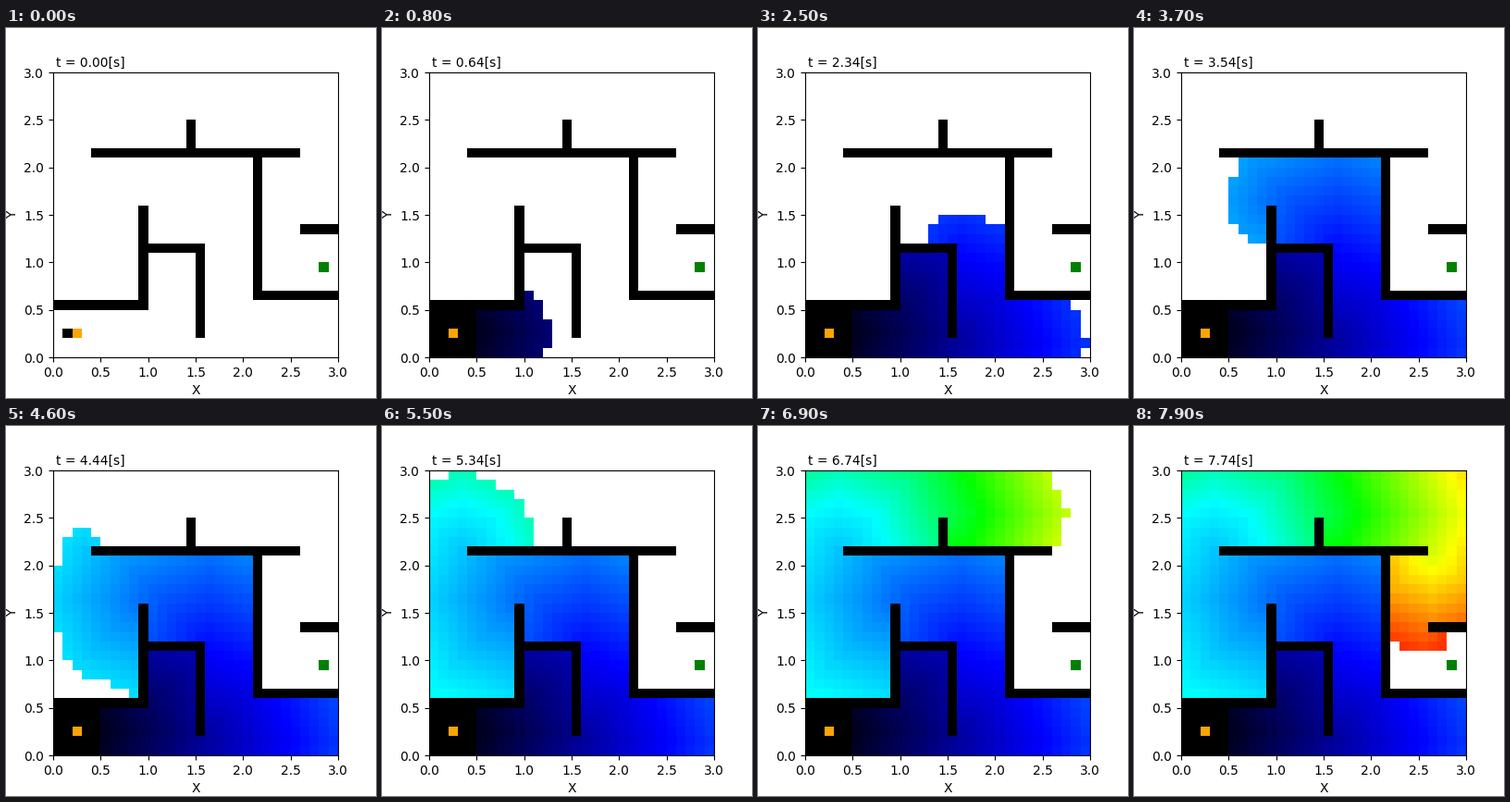
These frames come from a looping animation (400 px wide and 400 px high, 8 s). A matplotlib script:

```python
import itertools

import matplotlib.pyplot as plt
import numpy as np
from matplotlib.animation import FuncAnimation
from matplotlib.colors import LinearSegmentedColormap

SIZE = 30            # cells per side
SPAN = 3.0           # side length in data units
START, GOAL = (2, 2), (28, 9)
FRAMES, INTERVAL = 80, 100
DT = 0.01            # one cell is visited per DT
LEAD = 16            # visits held back at the beginning

# inclusive cell ranges: x0, x1, y0, y1
WALLS = [
    (0, 9, 5, 5), (9, 9, 5, 15), (10, 15, 11, 11), (15, 15, 2, 11),
    (4, 25, 21, 21), (14, 14, 22, 24), (21, 21, 6, 20),
    (21, 29, 6, 6), (26, 29, 13, 13),
]

ORANGE = (1, 165 / 255, 0)
GREEN = (0, 128 / 255, 0)
RAMP = LinearSegmentedColormap.from_list("ramp", [
    (0, 0, 0), (0, 0, 0.5), (0, 0, 1), (0, 0.5, 1),
    (0, 1, 1), (0, 1, 0), (1, 1, 0), (1, 0, 0)], N=1024)


def build_walls():
    blocked = np.zeros((SIZE, SIZE), bool)
    for x0, x1, y0, y1 in WALLS:
        blocked[y0:y1 + 1, x0:x1 + 1] = True
    return blocked


def dijkstra(blocked):
    """Return the visited cells in order, with their path costs."""
    moves = [m for m in itertools.product((-1, 0, 1), repeat=2) if any(m)]
    frontier, done = {START: 0.0}, {}
    while frontier:
        cell = min(frontier, key=lambda c: (round(frontier[c], 6), c))
        cost = done[cell] = frontier.pop(cell)
        for dx, dy in moves:
            x, y = cell[0] + dx, cell[1] + dy
            if not (0 <= x < SIZE and 0 <= y < SIZE):
                continue
            if blocked[y, x] or (x, y) in done:
                continue
            new = cost + np.hypot(dx, dy)
            if new < frontier.get((x, y), np.inf):
                frontier[x, y] = new
    return done


def shade(cost, top):
    return RAMP(0.0 if cost < 3 else cost / top)[:3]


blocked = build_walls()
costs = dijkstra(blocked)
cells = [c for c in costs if c not in (START, GOAL)]
colors = [shade(costs[c], costs[GOAL]) for c in cells]

base = np.ones((SIZE, SIZE, 3))
base[blocked] = 0
base[START[1], START[0]] = ORANGE
base[GOAL[1], GOAL[0]] = GREEN

fig, ax = plt.subplots(figsize=(4, 4), dpi=100)
image = ax.imshow(base, origin="lower", extent=(0, SPAN, 0, SPAN),
                  interpolation="nearest")
ax.set_xticks(np.arange(0, SPAN + 0.1, 0.5))
ax.set_yticks(np.arange(0, SPAN + 0.1, 0.5))
ax.set_xlabel("X")
ax.set_ylabel("Y")
clock = ax.text(0.01, 1.02, "", transform=ax.transAxes)


def update(frame):
    step = max(0, 10 * frame - LEAD)
    grid = base.copy()
    for (x, y), color in zip(cells[:step + 1], colors):
        grid[y, x] = color
    image.set_data(grid)
    clock.set_text(f"t = {step * DT:.2f}[s]")
    return image, clock


anim = FuncAnimation(fig, update, frames=FRAMES, interval=INTERVAL,
                     repeat=True, repeat_delay=0)
plt.show()
```
